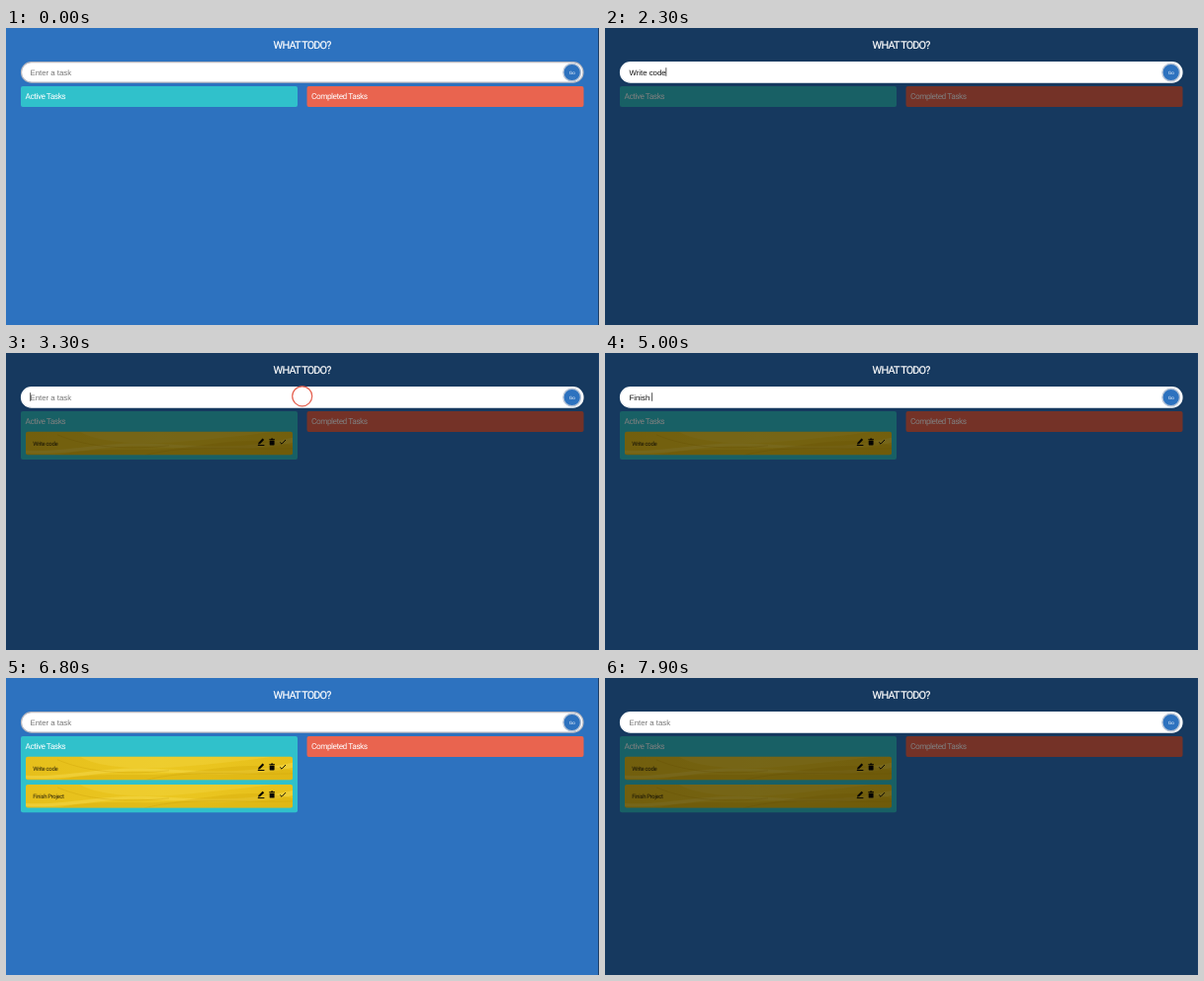
An HTML page for the animation above (8000 ms loop, 600 by 301 pixels).

```html
<!DOCTYPE html>
<html lang="en">
<head>
<meta charset="utf-8">
<title>What todo?</title>
<style>
  html, body { margin: 0; width: 100%; height: 100%; overflow: hidden; background: #2d72bf; }
  svg { display: block; }
  text { white-space: pre; text-rendering: geometricPrecision; }
  .hand { font-family: Roboto, sans-serif; fill: #fff; }
  .title { font-size: 10.8px; letter-spacing: -.78px; text-anchor: middle; stroke: #fff; stroke-width: .2px; }
  .head { font-size: 8.3px; letter-spacing: -.5px; }
  .label { font-size: 6px; letter-spacing: -.35px; fill: #2b230a; }
  .field { font: 7.8px "Liberation Sans", Arial, sans-serif; }
  .go { font: 4.6px "Liberation Sans", Arial, sans-serif; fill: #fff; text-anchor: middle; }
</style>
</head>
<body>
<svg width="600" height="301" viewBox="0 0 600 301">
  <defs>
    <linearGradient id="gold">
      <stop offset="0" stop-color="#e6bf1b"/>
      <stop offset=".5" stop-color="#ebc721"/>
      <stop offset="1" stop-color="#e7c01b"/>
    </linearGradient>
    <clipPath id="edge"><rect width="270" height="23.5" rx="2"/></clipPath>
    <g id="tile">
      <rect width="270" height="23.5" rx="2" fill="url(#gold)"/>
      <g clip-path="url(#edge)">
        <path d="M0 19C45 21 75 10 125 12S215 19 270 6V11C225 22 170 17 125 15S50 24 0 22Z" fill="#f6db52" opacity=".45"/>
        <path d="M30 24C80 13 115 22 160 16S235 5 270 14V24Z" fill="#d4aa0c" opacity=".4"/>
        <path d="M55 0C75 12 120 14 170 9S235 2 250 0Z" fill="#f3d441" opacity=".4"/>
        <path d="M32 3C65 17 105 18 145 14M120 24C165 12 215 19 270 17" fill="none" stroke="#c79d08" stroke-width=".6" opacity=".55"/>
      </g>
      <g fill="#0b0904">
        <path d="M235.4 11.2L239.6 6.8L241.2 8.3L237 12.4L235 12.7Z"/>
        <rect x="234.8" y="13.2" width="6.6" height="1"/>
        <path d="M246.3 7.4H248L248.4 6.7H250L250.4 7.4H252V8.3H246.3Z"/>
        <path d="M246.7 8.8H251.6V13Q251.6 13.7 250.9 13.7H247.4Q246.7 13.7 246.7 13Z"/>
      </g>
      <path d="M257.2 10.6L259 12.4L263 8.2" fill="none" stroke="#0b0904" stroke-width=".95"/>
    </g>
  </defs>

  <rect width="600" height="301" fill="#2d72bf"/>
  <rect id="active" x="15" y="59" width="280" height="21" rx="2" fill="#30c1cb"/>
  <rect x="304.5" y="59" width="280" height="21" rx="2" fill="#e9644f"/>
  <text class="hand head" x="19.6" y="72.4">Active Tasks</text>
  <text class="hand head" x="309" y="72.4">Completed Tasks</text>
  <g class="task" transform="translate(20 79.8)">
    <use href="#tile"/><text class="hand label" x="7.3" y="13.8">Write code</text>
  </g>
  <g class="task" transform="translate(20 107.9)">
    <use href="#tile"/><text class="hand label" x="7.3" y="13.8">Finish Project</text>
  </g>
  <rect id="dim" width="600" height="301" opacity=".5"/>

  <text class="hand title" x="299.6" y="20.9">WHAT TODO?</text>
  <rect id="pill" x="15.5" y="34.7" width="568.5" height="20.4" rx="10.2" fill="#fff" stroke-width="1.2"/>
  <circle cx="572.7" cy="45" r="8.8" fill="#2d72bf" stroke="#b5c3d6" stroke-width="1.4"/>
  <text class="go" x="572.7" y="46.6">Go</text>
  <text id="field" class="field" x="24.5" y="47.6"></text>
  <rect id="caret" y="40.2" width=".7" height="8.6" fill="#111"/>
  <circle id="ring" cx="299.7" cy="43.8" r="10" fill="none" stroke="#e5604f" stroke-width="1.2"/>
  <rect x="599" width="1" height="301" fill="#1b3d66"/>
</svg>
<script>
  const LOOP = 8000, ROW = 28.1;
  const $ = id => document.getElementById(id);
  const [active, dim, pill, field, caret, ring] =
    ['active', 'dim', 'pill', 'field', 'caret', 'ring'].map($);
  const tasks = [...document.querySelectorAll('.task')];

  // Each visit to the field: click, typing, submit (ms)
  const visits = [
    { click: 100, blink: 100, ringEnd: 200, submit: 2500, text: 'Write code',
      keys: [1000, 1200, 1300, 1500, 1600, 1700, 1900, 2000, 2200, 2300] },
    { click: 3300, blink: 3400, ringEnd: 3500, submit: 6500, text: 'Finish Project',
      keys: [4100, 4400, 4500, 4700, 4800, 4900, 5000, 5400, 5600, 5700, 5900, 6000, 6100, 6300] },
    { click: 7400, blink: 7400, ringEnd: 7500, submit: Infinity, text: '', keys: [] }
  ];

  const show = (el, on) => { el.style.display = on ? '' : 'none'; };

  function draw(t) {
    const visit = visits.find(v => t >= v.click && t < v.submit);
    const pressed = visit ? visit.keys.filter(k => k <= t) : [];
    const typed = visit ? visit.text.slice(0, pressed.length) : '';
    const done = visits.filter(v => t >= v.submit).length;

    tasks.forEach((task, i) => show(task, i < done));
    active.setAttribute('height', 21 + done * ROW);
    show(dim, visit);
    pill.setAttribute('stroke', visit ? '#fff' : '#b9b8bf');

    field.textContent = typed || 'Enter a task';
    field.setAttribute('fill', typed ? '#111' : '#757575');

    const since = visit ? t - (pressed.at(-1) ?? visit.blink) : 0;
    show(caret, visit && since % 1000 < 500);
    caret.setAttribute('x', 24.4 + (typed ? field.getComputedTextLength() : 0));
    show(ring, visit && t < visit.ringEnd);
  }

  const start = performance.now();
  function tick() {
    draw((performance.now() - start) % LOOP);
    requestAnimationFrame(tick);
  }
  tick();
</script>
</body>
</html>
```
